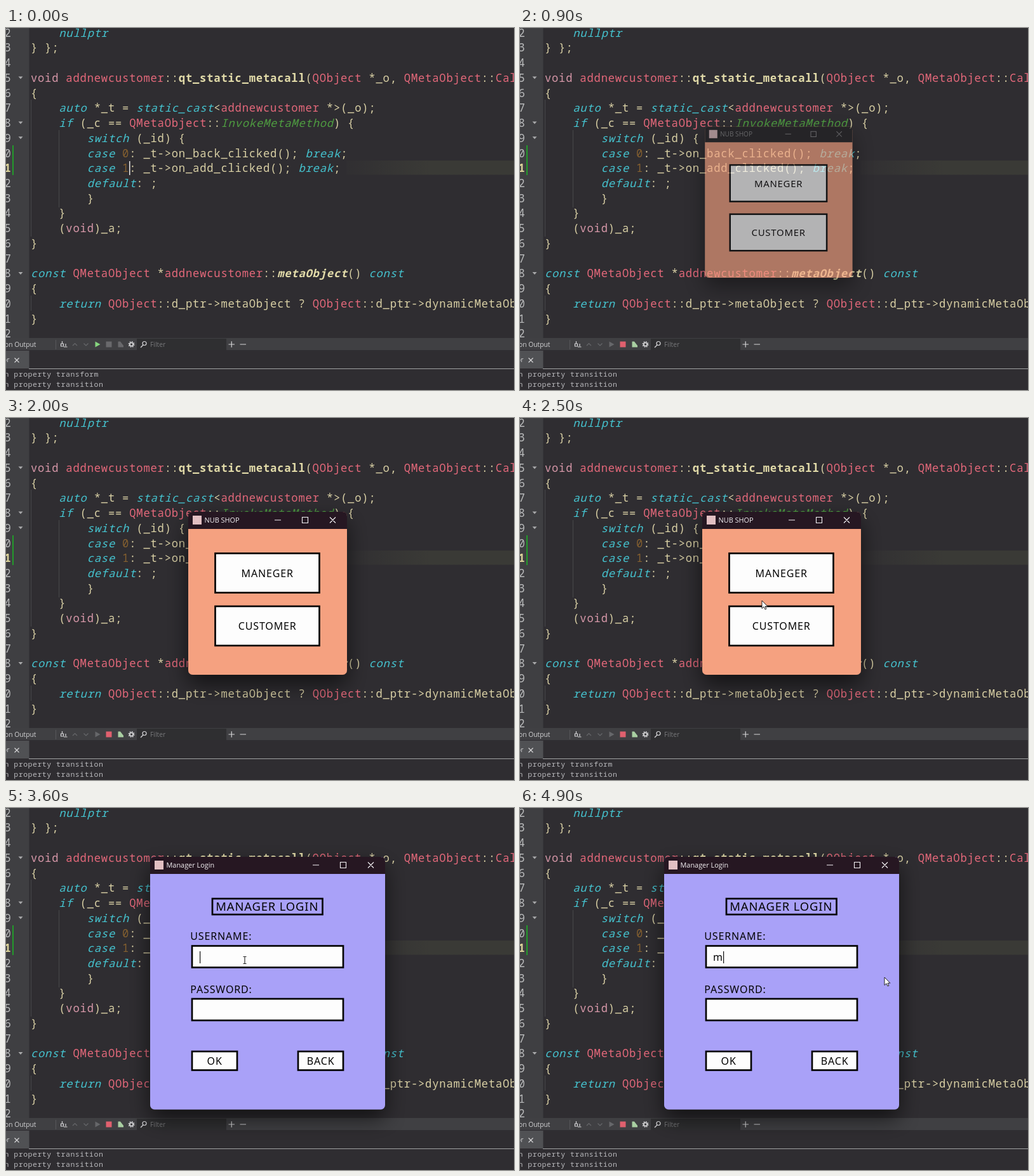
These frames come from a looping animation (800x571 px, 5 s). An HTML page:

```html
<!DOCTYPE html>
<html lang="en">
<head>
<meta charset="utf-8">
<title>Desktop app launch</title>
<style>
html, body { margin: 0; width: 100%; height: 100%; overflow: hidden; background: #2f2d31; }
svg { display: block; width: 100vw; height: 100vh; }
text { white-space: pre; }
.code { font: 17.2px "Noto Sans Mono", monospace; letter-spacing: .78px; fill: #d8cfa4; }
.k { fill: #45c3cf; font-style: italic; }
.t { fill: #e3687a; }
.p { fill: #d697a8; }
.n { fill: #85602f; }
.e { fill: #4f9d41; font-style: italic; }
.f { font-weight: 700; fill: #e2dba9; }
.i { font-style: italic; }
.num { fill: #b9babb; }
.now { fill: #dcd49a; font-weight: 700; }
.out { font: 11.5px "Noto Sans Mono", monospace; letter-spacing: .52px; fill: #b9b9bc; }
.ui { font: 10.3px "Open Sans", "Noto Sans", sans-serif; fill: #d2d2d4; }
.title { font: 10.9px "Open Sans", "Noto Sans", sans-serif; }
.form { font: 16px "Noto Sans", sans-serif; letter-spacing: .85px; fill: #050505; }
.mid { text-anchor: middle; }
.box { fill: #fdfdfd; stroke: #050505; stroke-width: 2.7; }
</style>
</head>
<body>
<svg id="stage" viewBox="0 0 800 571" preserveAspectRatio="none"></svg>
<script>
const LOOP = 5000;
const stage = document.getElementById('stage');
const $ = id => document.getElementById(id);

const rect = (x, y, w, h, attrs) => `<rect x="${x}" y="${y}" width="${w}" height="${h}" ${attrs}/>`;
const path = (d, attrs) => `<path d="${d}" ${attrs}/>`;
const text = (x, y, cls, str, attrs = '') => `<text x="${x}" y="${y}" class="${cls}" ${attrs}>${str}</text>`;
const esc = s => s.replace(/&/g, '&amp;').replace(/</g, '&lt;').replace(/>/g, '&gt;');

// Source lines: "[class|text]" marks a coloured token.
const LINES = [
  '    [k|nullptr]',
  '} };',
  '',
  '[p|void] [t|addnewcustomer]::[f|qt_static_metacall]([t|QObject] *_o, [t|QMetaObject]::[t|Call] _c, [p|int] _id)',
  '{',
  '    [k|auto] *_t = [k|static_cast]<[t|addnewcustomer] *>(_o);',
  '    [k|if] (_c == [t|QMetaObject]::[e|InvokeMetaMethod]) {',
  '        [k|switch] (_id) {',
  '        [k|case] [n|0]: _t->on_back_clicked(); [k|break];',
  '        [k|case] [n|1]: _t->on_add_clicked(); [k|break];',
  '        [k|default]: ;',
  '        }',
  '    }',
  '    ([p|void])_a;',
  '}',
  '',
  '[k|const] [t|QMetaObject] *[t|addnewcustomer]::[f i|metaObject]() [k|const]',
  '{',
  '    [k|return] [t|QObject]::d_ptr->metaObject ? [t|QObject]::d_ptr->dynamicMetaObject()',
  '}',
  ''
];
const FOLDS = [3, 6, 7, 16];
const CURRENT = 9;
const rowY = i => 13.7 + 23.73 * i;

function codeLine(src, i) {
  const spans = src.split(/\[([a-z ]+\|\w+)\]/).map((part, j) => {
    if (j % 2 === 0) return esc(part);
    const [cls, word] = part.split('|');
    return `<tspan class="${cls}">${word}</tspan>`;
  }).join('');
  const digit = (i + 2) % 10;
  return text(-2.6, rowY(i), 'code ' + (i === CURRENT ? 'now' : 'num'), digit) +
    text(38.9, rowY(i), 'code', spans);
}

function editor() {
  const guide = (x, y1, y2) => path(`M${x} ${y1}V${y2}`, 'stroke="#47474a"');
  return rect(0, 0, 800, 571, 'fill="#2f2d31"') +
    rect(0, 0, 36.5, 490, 'fill="#3f3f42"') +
    rect(536, 209, 264, 22.5, 'fill="url(#band)"') +
    rect(10, 185, 2, 47, 'fill="#239a2b"') +
    guide(39.5, 113, 329) + guide(83.5, 161, 283) + guide(39.5, 422, 446) +
    FOLDS.map(i => path(`M19.5 ${rowY(i) - 8.5}h7l-3.5 4z`, 'fill="#a9aaab"')).join('') +
    LINES.map(codeLine).join('') +
    rect(194, 210, 1.5, 22, 'id="caret" fill="#e8e8e8"');
}

function gear(x, y) {
  return `<circle cx="${x}" cy="${y}" r="2.7" fill="none" stroke="#d0d0d2" stroke-width="1.8"/>
    <circle cx="${x}" cy="${y}" r="4.2" fill="none" stroke="#d0d0d2" stroke-width="1.6" stroke-dasharray="1.65 1.65"/>`;
}

function panel() {
  const thin = 'fill="none" stroke="#d6d6d8" stroke-width="1.2"';
  const dim = 'fill="none" stroke="#66676a" stroke-width="1.2"';
  return rect(0, 489, 800, 82, 'fill="#2f2d31"') +
    rect(0, 489, 800, 19, 'fill="#404043"') +
    rect(206, 490, 141, 18, 'fill="#2f2f31"') +
    text(47.5, 503, 'ui', 'on Output', 'text-anchor="end"') +
    path('M78.5 492V507', 'stroke="#57585a"') +
    path('M88.5 494v4M86.5 498h4v4h-4zM91 503h5.5M94 498v4', thin) +
    path('M105 501l3.5-3.5 3.5 3.5M122.5 497.5l3.5 3.5 3.5-3.5', dim) +
    path('M140.5 494.5v9l8-4.5z', 'id="play"') +
    rect(157.5, 494.5, 9, 9, 'id="stop"') +
    path('M176.5 494.5v9h8.5v-2.5l-5-6.5z', 'id="debug"') +
    gear(197.5, 499) +
    `<circle cx="218" cy="497.5" r="3" ${thin}/>` + path('M216 500l-4 4', thin) +
    text(227, 503, 'ui', 'Filter', 'style="fill:#77787a"') +
    path('M350.5 499h9.5M355.2 494.3v9.5M368.5 499h9.5', thin) +
    rect(0, 509, 36.5, 28, 'fill="#505154"') +
    text(5.5, 527, 'ui', 'or', 'text-anchor="end"') +
    path('M13.5 520.5l7 7m0-7l-7 7', thin) +
    path('M36 537.5H800', 'stroke="#a2a2a4"') +
    text(-2.5, 550.4, 'out', '', 'id="log"') +
    text(-2.5, 566.4, 'out', 'n property transition');
}

function appWindow(id, x, y, w, h, name, color, content) {
  const r = x + w, cy = y + 13;
  const top = `M${x} ${y + 27}V${y + 7}q0 -7 7 -7H${r - 7}q7 0 7 7V${y + 27}z`;
  const buttons = `M${r - 114} ${cy}h10M${r - 70.5} ${cy - 4.5}h9v9h-9zM${r - 27} ${cy - 4.5}l9 9m0-9l-9 9`;
  return `<g id="${id}">` +
    rect(x, y, w, h, `rx="7" fill="${color}" filter="url(#shadow)"`) +
    path(top, `id="${id}Bar"`) +
    rect(x + 7, y + 6, 14, 14, 'fill="#e2bfc2"') +
    `<g id="${id}Ink">` +
    text(x + 25.5, y + 17.3, 'title', name, 'fill="currentColor"') +
    path(buttons, 'fill="none" stroke="currentColor" stroke-width="1.1"') +
    '</g>' + content + '</g>';
}

const box = (x, y, w, h, attrs = '') => rect(x + 1.5, y + 1.5, w - 3, h - 3, 'class="box" ' + attrs);

const home = () => appWindow('home', 287, 148, 250, 257, 'NUB SHOP', '#f5a180',
  box(328, 212, 167, 65, 'id="manager"') + text(411.7, 251, 'form mid', 'MANEGER') +
  box(328, 295.5, 167, 65) + text(411.7, 334, 'form mid', 'CUSTOMER'));

const login = () => appWindow('login', 227, 77, 370, 398.5, 'Manager Login', '#a9a1f8',
  box(323.5, 141.5, 176.5, 28, 'style="fill:none"') +
  text(411.3, 162.2, 'form mid', 'MANAGER LOGIN', 'style="font-size:18.4px"') +
  text(290.3, 208, 'form', 'USERNAME:') + box(291.5, 216, 241, 37) +
  text(290.3, 292, 'form', 'PASSWORD:') + box(291.5, 299.5, 241, 37) +
  box(291.5, 382.5, 74, 32.5) + text(328.6, 405, 'form mid', 'OK') +
  box(458.5, 382.5, 74, 32.5) + text(495.6, 405, 'form mid', 'BACK') +
  text(304, 241, 'form', 'm', 'id="typed"') +
  rect(305, 226, 1.2, 19, 'id="fieldCaret" fill="#111"'));

const pointers = () =>
  path('M0 0V12.5L3 9.8L5 14L6.9 13.2L5 9.2H8.9Z', 'id="arrow" fill="#fff" stroke="#111" stroke-width=".9"') +
  path('M-2.5 -5.5h2l.5 .5l.5 -.5h2M0 -5V5M-2.5 5.5h2l.5 -.5l.5 .5h2', 'id="beam" fill="none" stroke="#222" stroke-width="1.1"');

stage.innerHTML = `<defs>
  <linearGradient id="band"><stop offset="0" stop-color="#3a3a36" stop-opacity=".15"/><stop offset=".5" stop-color="#3a3a36"/></linearGradient>
  <filter id="shadow" x="-35%" y="-35%" width="170%" height="170%">
    <feDropShadow dx="0" dy="15" stdDeviation="17" flood-color="#000" flood-opacity=".6"/>
  </filter></defs>` + editor() + panel() + home() + login() + pointers();

const clamp = v => Math.max(0, Math.min(1, v));
const easeOut = v => 1 - (1 - v) ** 2;
const easeInOut = v => v * v * (3 - 2 * v);
const show = (id, on) => $(id).setAttribute('visibility', on ? 'visible' : 'hidden');
const paint = (id, color) => $(id).setAttribute('fill', color);

// Pointer path: time, x, y
const MOVES = [[2250, 388, 312], [2500, 381, 288], [2900, 376, 237], [3300, 376, 238], [3600, 376, 240], [3800, 376, 240], [4600, 574, 267]];

function pointerAt(t) {
  let i = 0;
  while (i < MOVES.length - 2 && t >= MOVES[i + 1][0]) i++;
  const [t0, x0, y0] = MOVES[i], [t1, x1, y1] = MOVES[i + 1];
  const p = easeInOut(clamp((t - t0) / (t1 - t0)));
  return [x0 + (x1 - x0) * p, y0 + (y1 - y0) * p];
}

function place(id, p, cx, cy) {
  const s = 0.8 + 0.2 * p;
  const el = $(id);
  el.setAttribute('transform', `translate(${cx * (1 - s)} ${cy * (1 - s)}) scale(${s})`);
  el.setAttribute('opacity', p);
  el.setAttribute('display', p > 0 ? 'inline' : 'none');
}

function setActive(id, on) {
  paint(id + 'Bar', on ? '#261722' : '#202022');
  $(id + 'Ink').setAttribute('color', on ? '#f5f2f5' : '#858587');
}

function draw(t) {
  const running = t >= 400;
  show('caret', t < 500);
  paint('play', running ? '#66676a' : '#86d67f');
  paint('stop', running ? '#e0606e' : '#69696c');
  paint('debug', running ? '#a9cfa2' : '#69696c');

  const transform = t < 700 || (t >= 2400 && t < 2700) || (t >= 4700 && t < 4900);
  $('log').textContent = 'n property ' + (transform ? 'transform' : 'transition');

  const opened = easeOut(clamp((t - 800) / 250));
  const closed = easeOut(clamp((t - 3350) / 200));
  place('home', opened * (1 - closed), 347, 250);
  setActive('home', t >= 1000 && t < 3250);
  place('login', easeOut(clamp((t - 3340) / 250)), 412, 276);
  setActive('login', t >= 3500);

  const [x, y] = pointerAt(t);
  const seen = t >= 2250;
  const hover = seen && y > 212 && y < 277;
  const manager = $('manager').style;
  manager.fill = hover ? '#dddddd' : '#fdfdfd';
  manager.stroke = hover ? '#858585' : '#050505';

  const overField = t >= 3250 && x > 292 && x < 532 && y > 216 && y < 253;
  show('arrow', seen && !overField);
  show('beam', seen && overField);
  for (const id of ['arrow', 'beam']) $(id).setAttribute('transform', `translate(${x} ${y})`);

  const typed = t >= 4700;
  show('typed', typed);
  show('fieldCaret', typed || Math.floor((t - 3600) / 500) % 2 === 0);
  $('fieldCaret').setAttribute('x', typed ? 320 : 305);
}

const start = performance.now();
function tick() {
  draw((performance.now() - start) % LOOP);
  requestAnimationFrame(tick);
}
tick();
</script>
</body>
</html>
```
